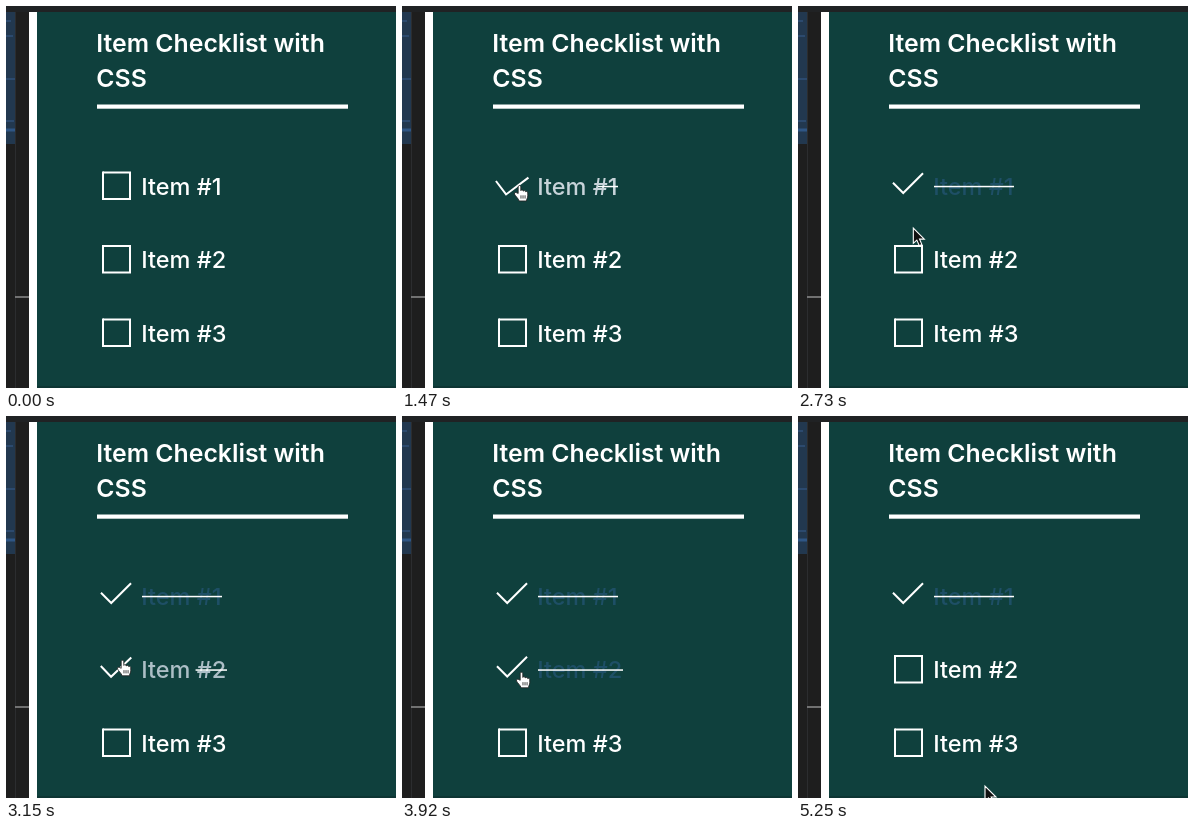
An HTML page that plays this animation: 390x382 px, repeating every 5320 ms.

```html
<!DOCTYPE html>
<html lang="en">
<head>
<meta charset="utf-8">
<title>Item Checklist with CSS</title>
<style>
html, body { margin: 0; width: 100%; height: 100%; overflow: hidden; background: #1e1e1e; }
svg { display: block; }
text { font-family: Inter, "Open Sans", sans-serif; font-size: 23.5px; font-weight: 500; fill: #fff; }
.title { font-size: 24.8px; font-weight: 600; }
.box path { fill: none; stroke: #fff; stroke-width: 2; }
</style>
</head>
<body>
<svg id="stage" width="390" height="382" viewBox="0 0 390 382">
  <rect width="390" height="382" fill="#1e1e1e"/>
  <rect y="6" width="9" height="132" fill="#22384f"/>
  <path d="M0 15H5M0 30H7M0 73H9M0 115H8" stroke="#30507a" stroke-width="1.5"/>
  <path d="M0 124H9" stroke="#2f5685" stroke-width="3"/>
  <path d="M9.5 6V382" stroke="#2c2d2f"/>
  <path d="M9 291H23" stroke="#8c8c8c" stroke-width="1.5"/>
  <rect x="23" y="6" width="8" height="376" fill="#fff"/>
  <rect x="31" y="6" width="359" height="376" fill="#0f403d"/>
  <rect x="31" y="380" width="359" height="2" fill="#0d3533"/>
  <rect width="390" height="6" fill="#202224"/>
  <text class="title" x="90.3" y="45.7">Item Checklist with</text>
  <text class="title" x="90.3" y="80.7">CSS</text>
  <rect x="91" y="98.5" width="251" height="4.2" fill="#fff"/>
  <g id="list"></g>
  <g id="cursor">
    <path id="arrow" d="M0 0V15.2L3.5 12L6 17.6L8.6 16.5L6.2 11H11Z" fill="#111" stroke="#fff" stroke-width="1.1"/>
    <g id="hand" transform="scale(.93)" fill="#fff" stroke="#222" stroke-width=".9" stroke-linejoin="round">
      <path d="M.2 10.5V3.6C.2 1.4 3 1.4 3 3.6V7.4C3.4 6.3 5.6 6.4 5.7 8C6.3 7 8.2 7.3 8.3 8.7C9.2 8 10.5 8.6 10.5 10V13C10.5 15.5 9.3 16 9 18.6H1.2C.6 16-3 13.2-3.8 11.2C-4.2 9.4-2.4 9-1.2 9.8Z"/>
      <path d="M3.2 12.5V16M5.4 12.5V16M7.6 12.5V16" fill="none"/>
    </g>
  </g>
</svg>
<script>
const LOOP = 5320, STEP = 70, PITCH = 73.5;
const FADE = 500, MORPH = 230;
const WHITE = [255, 255, 255], MUTED = [30, 79, 102];

const items = [
  { name: "Item #1", width: 80, on: 1345 },
  { name: "Item #2", width: 85, on: 2965, off: 4010 },
  { name: "Item #3", width: 85 }
];

// time, x, y of the pointer tip
const route = [
  [70, 258, 333], [560, 136, 219], [770, 116, 177.5],
  [2380, 116, 178], [2940, 115, 242.5], [3500, 115, 242.5],
  [3640, 117, 252], [3780, 117, 252], [3920, 118, 254.5],
  [4830, 118, 254.5], [5250, 187, 370]
];

const $ = id => document.getElementById(id);
const clamp = v => Math.min(1, Math.max(0, v));
const mix = (a, b, k) => a + (b - a) * k;
const easeOut = k => 1 - (1 - k) ** 2.2;
const smooth = k => k * k * (3 - 2 * k);

function add(parent, tag, attrs) {
  const el = document.createElementNS("http://www.w3.org/2000/svg", tag);
  set(el, attrs);
  parent.append(el);
  return el;
}

function set(el, attrs) {
  for (const key in attrs) el.setAttribute(key, attrs[key]);
}

items.forEach((item, i) => {
  const row = add($("list"), "g", { transform: `translate(0 ${i * PITCH})` });
  item.box = add(row, "g", { class: "box" });
  item.kept = add(item.box, "path", {});
  item.gone = add(item.box, "path", {});
  item.label = add(row, "text", { x: 135.2, y: 188.8 });
  item.label.textContent = item.name;
  item.strike = add(row, "rect", { y: 179.8, height: 1.5, fill: "#fff" });
});

// 0 = open, 1 = done
function progress({ on, off }, t, length) {
  if (off !== undefined && t >= off) return 1 - clamp((t - off) / length);
  return on === undefined ? 0 : clamp((t - on) / length);
}

function drawItem(item, t) {
  const closing = item.off === undefined || t < item.off;
  const raw = progress(item, t, MORPH);
  const turn = closing ? easeOut(raw) : 1 - easeOut(1 - raw);
  const w = 27, h = mix(26.6, 13.5, turn);
  const left = 97, right = left + w, top = 166.5, bottom = top + h;
  set(item.box, {
    transform: `translate(${-0.5 * turn} ${-0.5 * turn}) rotate(${-45 * turn} ${left + w / 2} ${top + h / 2})`
  });
  set(item.kept, { d: `M${left} ${top - 1}V${bottom}H${right + 1}` });
  set(item.gone, { d: `M${left} ${top}H${right}V${bottom}`, opacity: clamp(1 - 1.5 * turn) });

  const done = progress(item, t, FADE);
  const length = item.width * done;
  const start = closing ? item.width - length : 0;
  set(item.strike, { x: 136 + start, width: length });
  item.label.style.fill = `rgb(${WHITE.map((c, i) => Math.round(mix(c, MUTED[i], done)))})`;
}

function drawCursor(t) {
  const visible = t >= route[0][0];
  $("cursor").style.display = visible ? "" : "none";
  if (!visible) return;
  const next = route.findIndex(p => p[0] > t);
  const b = route[next < 0 ? route.length - 1 : next];
  const a = next < 0 ? b : route[next - 1];
  const k = a === b ? 0 : smooth((t - a[0]) / (b[0] - a[0]));
  const x = mix(a[1], b[1], k), y = mix(a[2], b[2], k);
  const overRow = items.some((_, i) => Math.abs(y - 180 - i * PITCH) < 16);
  const pointing = t >= 980 && overRow;
  $("hand").style.display = pointing ? "" : "none";
  $("arrow").style.display = pointing ? "none" : "";
  set($("cursor"), { transform: `translate(${x} ${y})` });
}

function draw(now) {
  const t = Math.floor((now % LOOP) / STEP) * STEP;
  items.forEach(item => drawItem(item, t));
  drawCursor(t);
}

const begin = performance.now();
function tick() {
  draw(performance.now() - begin);
  requestAnimationFrame(tick);
}
tick();
</script>
</body>
</html>
```
